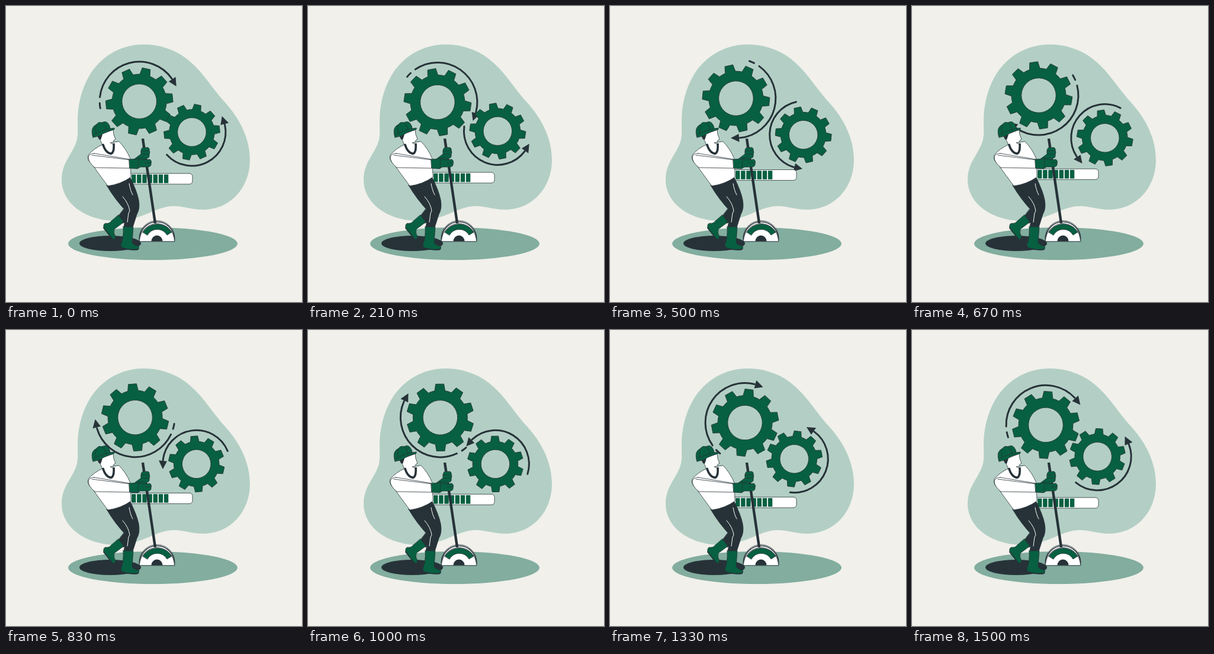
An HTML page that plays this animation: 500 px wide and 500 px high, repeating every 1.54 s.

```html
<!DOCTYPE html>
<html lang="en">
<head>
<meta charset="utf-8">
<title>Gears and lever</title>
<style>
  html, body { margin: 0; width: 100%; height: 100%; overflow: hidden; background: #f1f0eb; }
  svg { display: block; width: 100vw; height: 100vh; }
  .green { fill: #076041; }
  .dark { fill: #263238; }
  .white { fill: #fff; }
  .line { fill: none; }
  .ink { stroke: #263238; stroke-width: .8; stroke-linejoin: round; stroke-linecap: round; }
  .arc { fill: none; stroke: #263238; stroke-width: 3; stroke-linecap: round; }
  .crease { fill: none; stroke: #fff; stroke-width: 1; stroke-linecap: round; }
</style>
</head>
<body>
<svg viewBox="0 0 500 500">
  <rect width="500" height="500" fill="#f1f0eb"/>
  <path fill="#b3cfc5" d="M232 65C190 65 157 89 140 119C127 142 121 168 121 194C121 207 122 216 120 225C115 248 94 263 94 293C94 337 140 363 186 363C232 362 252 338 284 338C301 338 312 344 333 344C378 344 412 308 412 260C412 226 397 193 371 164C346 137 335 113 305 89C283 72 257 65 232 65Z"/>
  <ellipse cx="248" cy="401.5" rx="143" ry="27.5" fill="#82ad9f"/>
  <ellipse class="dark" cx="176" cy="401" rx="52" ry="13"/>

  <g id="big"></g>
  <g id="small"></g>

  <g id="bar">
    <rect class="white ink" x="196" y="-9" width="119" height="18" rx="5"/>
  </g>

  <g id="base">
    <path class="white ink" d="M225 397V392A30 29.5 0 0 1 285 392V397Z"/>
    <path class="line ink" style="stroke-width:1.6" d="M225.500 394A29.500 29.500 0 0 1 284.500 394"/>
  </g>
  <path d="M231 224L252 367" stroke="#263238" stroke-width="4.4"/>
  <path class="white ink" d="M225.500 397.500A29.500 30 0 0 1 284.500 397.500Z"/>
  <path class="green ink" d="M231 382A29 29 0 0 1 280 382L272 387A19 19 0 0 0 239 387Z"/>
  <path class="dark" d="M245.500 397.500A9.500 10 0 0 1 264.500 397.500Z"/>

  <g id="man">
    <path class="dark ink" d="M199 343L207 350L205 364L197 367L189 356Z"/>
    <path class="green ink" d="M190 353L199 365L183 377Q181 383 185 390Q184 395 180 394L165 375Q164 368 168 367Q174 368 177 364Z"/>
    <path class="line ink" style="stroke-width:1.8" d="M180 394L165 375"/>
    <path class="dark ink" d="M170 303L209 288Q221 312 224 327Q227 342 221 352L214 374L199 373L204 348Q184 327 170 303Z"/>
    <path class="crease" d="M197 322Q207 333 209 346L207 350L205 365M208 300Q210 312 214 319"/>
    <path class="green ink" d="M198 373L215 373L213 400Q216 404 224 406Q226 411 221 412Q207 413 195 408L194 403Q199 393 198 373Z"/>
    <path class="line ink" style="stroke-width:1.8" d="M195 408Q208 413 223 411"/>

    <path class="white ink" d="M191 229Q203 241 210 258L211 289Q194 301 172 304Q157 284 145 267Q136 260 139 252Q147 241 165 233Z"/>
    <path class="white ink" d="M155 219L181 209L182 217L185 225L182 227Q182 231 176 231L181 233L183 244Q178 251 172 247L163 235L160 228Z"/>
    <path class="line" stroke="#263238" stroke-width="3.6" d="M163.500 233Q168 248 177 249.500Q183 248 182 232"/>
    <path class="dark" d="M154 219L163 217L160 226L157 225Z"/>
    <path class="green ink" d="M147 222Q144 213 146 207Q148 202 153 200Q156 195 162 197Q169 193 173 199Q176 203 176 207L183 206Q184 208 182 209Q166 213 159 219Q152 221 147 222Z"/>
    <path class="line ink" d="M146 219Q157 211 176 207M153 200Q150 207 152 215M162 197Q168 201 169 209"/>

    <path class="green ink" d="M216 259L228 250Q227 241 231 239L240 239Q243 241 242 244Q244 247 242 250Q243 256 239 257L231 261Z"/>
    <path class="line ink" d="M229 245L242 244M229 250L242 250M221 257L234 256"/>
    <path class="white ink" d="M149 249L209 259L209 274L150 273Q139 264 139 255Q141 249 149 249Z"/>
    <path class="line ink" d="M145 252Q178 256 209 260"/>
    <path class="green ink" d="M208 259L224 258Q232 261 243 259Q247 262 245 266Q246 271 240 272L227 272L222 275L209 274Z"/>
    <path class="line ink" d="M224 258L223 274M235 265L245 265"/>
  </g>
</svg>

<script>
const NS = "http://www.w3.org/2000/svg";
const LOOP = 1540, STEPS = 37, FPMS = .024;
const el = id => document.getElementById(id);

function add(parent, tag, attrs) {
  const node = document.createElementNS(NS, tag);
  for (const k in attrs) node.setAttribute(k, attrs[k]);
  parent.append(node);
}

function polar(r, deg) {
  const a = deg * Math.PI / 180;
  return (r * Math.cos(a)).toFixed(2) + " " + (r * Math.sin(a)).toFixed(2);
}

const arc = (r, from, to) =>
  `M${polar(r, from)}A${r} ${r} 0 ${to - from > 180 ? 1 : 0} 1 ${polar(r, to)}`;

function gearPath(outer, root, hole) {
  let d = "";
  for (let k = 0; k < 10; k++) {
    const a = 30 + 36 * k;
    d += `${k ? `A${root} ${root} 0 0 1 ` : "M"}${polar(root, a - 11)}` +
      `L${polar(outer, a - 7)}L${polar(outer, a + 7)}L${polar(root, a + 11)}`;
  }
  d += `A${root} ${root} 0 0 1 ${polar(root, 19)}Z`;
  return d + `M${hole} 0A${hole} ${hole} 0 1 0 ${-hole} 0A${hole} ${hole} 0 1 0 ${hole} 0Z`;
}

// The gear sits off the pivot, so the whole group wobbles as it turns.
function buildGear(id, x, y, radii, arcs, head) {
  const g = document.createElementNS(NS, "g");
  g.setAttribute("transform", `translate(${x} ${y})`);
  add(g, "path", { class: "green ink", "fill-rule": "evenodd", d: gearPath(...radii) });
  for (const a of arcs) add(g, "path", { class: "arc", d: arc(...a) });
  const [r, base, tip] = head;
  add(g, "path", {
    class: "dark",
    d: `M${polar(r - 7, base)}L${polar(r + 7, base)}L${polar(r + .5, tip)}Z`
  });
  el(id).append(g);
}

buildGear("big", 4.7, 6.1, [57, 46, 29.3], [[67, 186, 325], [67, 170, 177.5]], [67, -34, -22]);
buildGear("small", -5, -6, [47.5, 38.3, 24.3], [[57, -13, 138]], [57, -14, -28]);

for (let i = 0; i < 7; i++)
  add(el("bar"), "rect", { class: "green", x: 212 + i * 9.15, y: -7.3, width: 7.4, height: 14.6 });

// Almost constant speed, a little slower at the end of the turn.
const turn = i => i < 32 ? i * 319 / 32 : 319 + (i - 32) * 41 / 5;

function draw(now) {
  const step = Math.floor((now % LOOP + 3.4) * FPMS) % STEPS;
  const angle = turn(step);
  const bob = 288 + 4 * Math.cos(2 * Math.PI * step / STEPS + .2);
  el("big").setAttribute("transform", `translate(220.5 155) rotate(${angle})`);
  el("small").setAttribute("transform", `translate(319 219) rotate(${angle})`);
  el("bar").setAttribute("transform", `translate(0 ${bob.toFixed(2)})`);
}

const start = performance.now();
function loop() {
  draw(performance.now() - start);
  requestAnimationFrame(loop);
}
loop();
</script>
</body>
</html>
```
